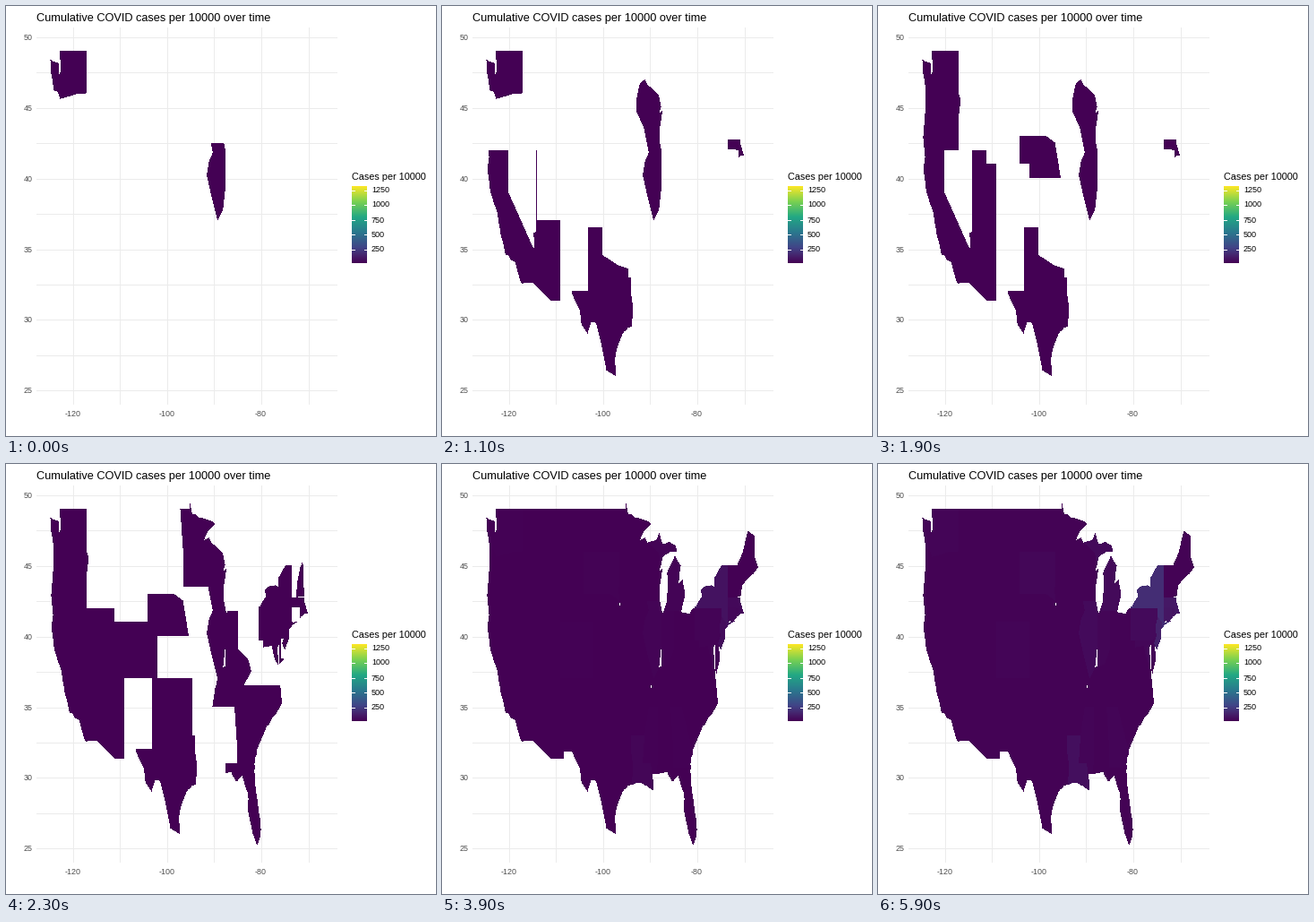
Animation, 480 px wide and 480 px high, one loop 8 s. Source, as a matplotlib script:

```python
import numpy as np
import matplotlib.pyplot as plt
from matplotlib.animation import FuncAnimation
from matplotlib.colors import LinearSegmentedColormap
from matplotlib.path import Path

SIZE, DPI = 480, 80
FRAMES, INTERVAL = 80, 100
TOP_CASES = 1300
LAST_NEW, LAST_STEP = 7, 15

# states by the step they first report; all others join at LAST_NEW
FIRST_SEEN = ["WA IL", "CA AZ", "WI MA", "TX", "NE", "OR UT",
              "NV CO OK MN IN KY TN NC SC GA FL NY PA MD NJ NH RI"]
START = {name: step for step, names in enumerate(FIRST_SEEN)
         for name in names.split()}
START["WV"] = LAST_NEW + 1
CASES = dict(NY=170, NJ=125, MA=90, CT=80, RI=70, LA=55, IL=38, PA=38, MI=35,
             DE=30, MD=26, SD=24, IN=20, GA=19, CO=18, WA=18, MS=18)
FEW = 9

plt.rcParams["font.family"] = "Liberation Sans"
viridis = LinearSegmentedColormap.from_list("cases", [
    (0, "#440154"), (0.1, "#46246d"), (0.2, "#414487"), (0.4, "#2a788e"),
    (0.6, "#22a884"), (0.8, "#7ad151"), (1, "#fde725")], N=1024)

fig = plt.figure(figsize=(SIZE / DPI, SIZE / DPI), dpi=DPI, facecolor="white")
ax = fig.add_axes([0, 0, 1, 1])
ax.axis("off")


def label(x, y, text, px, color="black", ha="left"):
    ax.text(x, y, text, fontsize=px * 72 / DPI, color=color, ha=ha, va="baseline")


def line(x0, y0, x1, y1, color="#ebebeb", z=1):
    ax.plot([x0, x1], [y0, y1], color=color, lw=72 / DPI, antialiased=False,
            solid_capstyle="butt", zorder=z)


def lon_x(lon):
    return 74.1 + 5.26 * (lon + 120)


def lat_y(lat):
    return 34.3 + 15.78 * (50 - lat)


# grid and axes
for lon in range(-120, -69, 10):
    x = int(lon_x(lon)) + 0.5
    line(x, 24, x, 444)
    if lon % 20 == 0:
        label(x, 458.5, str(lon), 8.9, "#4d4d4d", "center")
for half in range(50, 101, 5):
    y = int(lat_y(half / 2)) + 0.5
    line(34, y, 368.5, y)
    if half % 10 == 0:
        label(29.3, y + 3.6, str(half // 2), 8.9, "#4d4d4d", "right")
label(34, 17, "Cumulative COVID cases per 10000 over time", 12.75)

# legend
label(386, 194, "Cases per 10000", 10.9)
ax.imshow(np.linspace(1, 0, 300)[:, None], cmap=viridis, aspect="auto",
          extent=(386, 403, 287, 201), interpolation="nearest", zorder=2)
for v in range(250, 1251, 250):
    y = int(287.5 - v * 0.0656) + 0.5
    line(386, y, 389.4, y, "white", 3)
    line(399.6, y, 403, y, "white", 3)
    label(408, y + 3, str(v), 9)

# land: key points of the coast, roughened
rng = np.random.default_rng(4)


def rough(points, depth=3, amount=0.04):
    p = np.array(points, float)
    for _ in range(depth):
        length = np.hypot(*(p[1:] - p[:-1]).T)[:, None]
        mid = (p[1:] + p[:-1]) / 2 + rng.normal(0, amount, (len(p) - 1, 2)) * length
        out = np.empty((2 * len(p) - 1, 2))
        out[::2], out[1::2] = p, mid
        p = out
    return p


pacific = [(-122.75, 49), (-122.5, 48.2), (-122.7, 47.2), (-122.9, 48.1),
           (-124.7, 48.4), (-124.05, 46.3), (-124, 45), (-124.5, 42.9),
           (-124.1, 41.5), (-124.35, 40.4), (-123.7, 38.9), (-122.4, 37.6),
           (-121.9, 36.6), (-120.6, 34.6), (-118.5, 34), (-117.2, 32.55)]
mexico = [(-114.8, 32.6), (-111, 31.35), (-108.2, 31.35), (-108.2, 31.8),
          (-106.5, 31.8), (-104.8, 30.6), (-104.5, 29.65), (-103.2, 29),
          (-102.4, 29.85), (-101.4, 29.75), (-100.3, 28.3), (-99.2, 26.4)]
gulf = [(-97.2, 26), (-97.4, 27.2), (-96.5, 28.4), (-94.7, 29.4), (-92.2, 29.6),
        (-89.2, 29.1), (-89.5, 30.2), (-86.3, 30.4), (-85.3, 29.7), (-84, 30.1),
        (-82.7, 28.8), (-82.7, 27.6), (-81.8, 26.1), (-80.8, 25.2)]
atlantic = [(-80.1, 25.8), (-80.05, 26.9), (-81.3, 29.9), (-81.3, 31.3),
            (-79.2, 33.2), (-78, 33.9), (-76.5, 34.7), (-75.5, 35.3), (-76, 36.9),
            (-76.3, 38), (-76.5, 39.2), (-76.1, 39.4), (-75.9, 37.2), (-75.1, 38.4),
            (-75.4, 39.4), (-74.9, 39), (-74.05, 39.8), (-73.9, 40.55),
            (-71.9, 41.05), (-73.4, 40.95), (-71.4, 41.4), (-70, 41.6),
            (-70.8, 42.5), (-70.3, 43.6), (-68.5, 44.3), (-67, 44.85)]
canada = [(-67.8, 45.7), (-67.8, 47.1), (-69.2, 47.45), (-70.3, 45.9),
          (-71.5, 45), (-74.8, 45)]
lakes = [(-76.3, 44.1), (-76.3, 43.5), (-79.1, 43.3), (-78.9, 42.8), (-81.5, 41.6),
         (-83.3, 41.7), (-82.5, 42.9), (-83, 44.05), (-83.9, 43.7), (-83.4, 45),
         (-84.7, 45.75), (-86.3, 44.5), (-86.3, 42.5), (-87.2, 41.65),
         (-87.8, 42.4), (-87.8, 43.7), (-87.3, 44.8), (-88, 44.6), (-87.2, 45.6),
         (-84.2, 46), (-84.6, 46.45), (-87.3, 46.5), (-88, 47.3), (-88.6, 46.8),
         (-90.4, 46.6), (-91, 46.95), (-92.1, 46.75), (-89.6, 48), (-92, 48.3),
         (-94.6, 48.7)]
corner = [(-95, 49.38), (-95.2, 49.38), (-95.2, 49)]
outline = np.vstack([rough(pacific), mexico, rough(gulf), rough(atlantic),
                     canada, rough(lakes), corner])

# every pixel centre as (lon, lat)
px = np.arange(SIZE) + 0.5
lon, lat = np.meshgrid((px - lon_x(0)) / 5.26, (lat_y(0) - px) / 15.78)
centres = np.column_stack([lon.ravel(), lat.ravel()])


def inside(points):
    path = Path(np.vstack([points, points[:1]]))
    return path.contains_points(centres).reshape(SIZE, SIZE)


land = inside(outline)
owner = np.zeros((SIZE, SIZE), int)
names = [None]


def state(name, *points):
    """Claim an area, over earlier ones; two points are opposite corners."""
    if len(points) == 2:
        (w, n), (e, s) = points
        points = (w, n), (e, n), (e, s), (w, s)
    names.append(name)
    owner[inside(np.array(points)) & land] = len(names) - 1


# West and plains
state("MO", (-95.8, 40.6), (-89.1, 36.5))
state("WA", (-125, 49.1), (-117, 45))
state("MT", (-116.05, 49.1), (-104, 44.4))
state("UT", (-114.05, 42), (-109.05, 37))
state("WY", (-111.05, 45), (-104, 41))
state("ID", (-117.05, 49.1), (-116.05, 49.1), (-116.05, 48), (-114.3, 45.5),
      (-113, 44.5), (-111.05, 44.5), (-111.05, 42), (-117.05, 42))
state("OR", (-125, 46.25), (-123.2, 46.15), (-122.6, 45.6), (-119, 45.95),
      (-117, 46), (-116.5, 45.5), (-117.05, 44.2), (-117.05, 42), (-125, 42))
state("CA", (-125, 42), (-114, 32))
state("NV", (-120, 42), (-114.05, 42), (-114.05, 36), (-114.65, 35), (-120, 39))
state("AZ", (-114.05, 37), (-114.05, 36.2), (-114.7, 36.1), (-114.1, 34.3),
      (-114.8, 32.4), (-114.8, 31), (-109.05, 31), (-109.05, 37))
state("CO", (-109.05, 41), (-102.05, 37))
state("NM", (-109.05, 37), (-103.05, 31))
state("TX", (-106.6, 32), (-103.05, 32), (-103.05, 36.5), (-93.5, 36.5),
      (-93.5, 25), (-106.6, 25))
state("OK", (-103.05, 37), (-94.45, 37), (-94.45, 33.6), (-96.5, 33.8),
      (-100, 34.55), (-100, 36.5), (-103.05, 36.5))
state("ND", (-104.05, 49.1), (-96.4, 45.95))
state("SD", (-104.05, 45.95), (-96.4, 42.4))
state("WI", (-93, 47), (-86.8, 42.5))
state("MN", (-97.2, 49.4), (-89.4, 49.4), (-89.4, 48), (-92.2, 46.6),
      (-92.8, 45.6), (-92.8, 44.7), (-91.2, 43.5), (-96.45, 43.5), (-96.5, 46))
state("IA", (-96.7, 43.5), (-91.2, 43.5), (-90.2, 41.8), (-91.4, 40.4),
      (-95.8, 40.55))
state("NE", (-104.05, 43), (-98.5, 43), (-96.5, 42.5), (-95.3, 40),
      (-102.05, 40), (-102.05, 41), (-104.05, 41))
state("KS", (-102.05, 40), (-94.6, 37))

# South and Great Lakes
state("VA", (-83.7, 39.5), (-75.2, 36.55))
state("AR", (-94.45, 36.5), (-89.7, 33))
state("LA", (-94.05, 33), (-94.05, 32), (-93.6, 31), (-93.8, 28.9), (-89, 28.9),
      (-89.6, 31), (-91, 33))
state("AL", (-88.5, 35), (-85, 30))
state("FL", (-87.6, 31), (-79.9, 25))
state("MS", (-90.2, 35), (-88.2, 35), (-88.4, 30), (-89.5, 30), (-89.75, 31),
      (-91.5, 31), (-91.1, 33))
state("NC", (-84.4, 36.55), (-75.3, 33.7))
state("TN", (-90.3, 35), (-84.3, 35), (-81.7, 36.55), (-89.6, 36.55))
state("GA", (-85.6, 35), (-83.1, 35), (-80.8, 32), (-81, 30.7), (-85, 30.7),
      (-85.1, 32.5))
state("SC", (-83.3, 35.1), (-80.9, 35.1), (-79.7, 34.8), (-78.5, 33.8), (-80.9, 31.9))
state("IN", (-87.55, 41.75), (-84.8, 37.7))
state("OH", (-84.8, 42), (-80.5, 38.4))
state("MI", (-90.4, 46.6), (-88.1, 45.9), (-87.6, 45.1), (-86.9, 45),
      (-86.9, 41.75), (-82.4, 41.75), (-82.4, 47), (-88, 47.6))
state("IL", (-90.65, 42.5), (-87, 42.5), (-87.55, 41.7), (-87.55, 39.2),
      (-88.1, 37.6), (-89.2, 37), (-90.2, 38.3), (-91.5, 40.2), (-91, 41.2),
      (-90.2, 41.8))
state("KY", (-89.5, 36.55), (-83.6, 36.55), (-82, 37.5), (-82.6, 38.3),
      (-84.8, 39.1), (-86, 38), (-88, 37.8), (-89.2, 37))

# Northeast
state("NY", (-80.5, 45.1), (-71.8, 40.5))
state("PA", (-80.5, 42), (-74.8, 39.72))
state("MD", (-79.5, 39.72), (-75, 39.72), (-75, 38.4), (-76.3, 37.9),
      (-77.1, 38.4), (-77.7, 39.3), (-79.5, 39.2))
state("WV", (-82.6, 38.3), (-81.7, 39.2), (-80.7, 40.1), (-80.5, 40.1),
      (-80.5, 39.72), (-79.5, 39.72), (-79.5, 39.2), (-77.7, 39.3),
      (-79, 38.7), (-80.3, 37.5), (-81.3, 37.2), (-82, 37.5))
state("DE", (-75.75, 39.8), (-75, 38.45))
state("NJ", (-75.5, 39.5), (-75, 40), (-75.2, 40.7), (-74.7, 41.35),
      (-73.9, 41), (-73.9, 39), (-75, 38.8))
state("VT", (-73.4, 45.1), (-71.4, 42.7))
state("ME", (-71.1, 47.6), (-66.9, 42.8))
state("MA", (-73.4, 42.75), (-69.8, 41.2))
state("CT", (-73.5, 42.05), (-71.8, 41.05))
state("RI", (-71.8, 42), (-71.2, 41.2))
state("NH", (-71.5, 45.1), (-71.1, 45.4), (-70.8, 42.8), (-72.5, 42.75),
      (-72.3, 43.8))

world = ax.imshow(np.zeros((SIZE, SIZE, 4)), extent=(0, SIZE, SIZE, 0),
                  aspect="auto", interpolation="nearest", zorder=2)
ax.set_xlim(0, SIZE)
ax.set_ylim(SIZE, 0)


def draw(i):
    step = (i + 1) // 4
    growth = np.clip((step - LAST_NEW) / (LAST_STEP - LAST_NEW), 0, 1)
    colors = np.zeros((len(names), 4))
    for k, name in enumerate(names[1:], 1):
        if step >= START.get(name, LAST_NEW):
            colors[k] = viridis(CASES.get(name, FEW) * growth / TOP_CASES)
    world.set_data(colors[owner])
    return [world]


anim = FuncAnimation(fig, draw, frames=FRAMES, interval=INTERVAL,
                     repeat=True, repeat_delay=0, blit=False)
plt.show()
```
